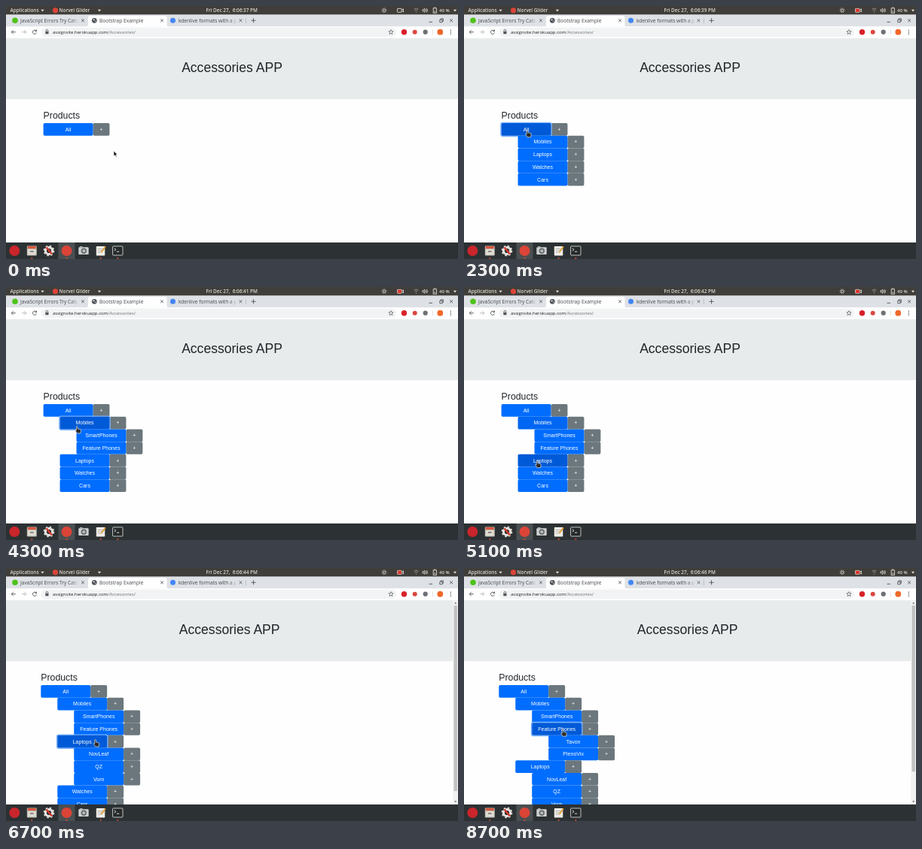
An HTML page that plays this animation: 600 by 337 pixels, repeating every 9 s.

```html
<!DOCTYPE html>
<html lang="en">
<head>
<meta charset="utf-8">
<title>Accessories APP</title>
<style>
  html, body { margin: 0; width: 100%; height: 100%; overflow: hidden; background: #fefefe; }
  svg { display: block; width: 600px; height: 337px; }
  text { white-space: pre; }
  .ui { font: 6.6px "Open Sans", "Noto Sans", sans-serif; }
  .bar { fill: #dfdbd2; font-size: 6.4px; font-weight: 600; }
  .tab { fill: #45494d; }
  .page { font-family: "Liberation Sans", Arial, sans-serif; fill: #212529; }
  .btn { font-size: 7.03px; fill: #fff; text-anchor: middle; }
  .line { fill: none; stroke: #50555a; stroke-width: .9; }
  .tray { fill: none; stroke: #dfdbd2; stroke-width: .9; }
</style>
</head>
<body>
<svg viewBox="0 0 600 337" xmlns="http://www.w3.org/2000/svg">
  <defs>
    <clipPath id="view"><rect y="42.5" width="600" height="272.5"/></clipPath>
    <linearGradient id="fade"><stop offset=".86" stop-color="#fff"/><stop offset="1" stop-color="#000"/></linearGradient>
    <mask id="fadeA"><rect x="18" y="12" width="79" height="14" fill="url(#fade)"/></mask>
    <mask id="fadeB"><rect x="228" y="12" width="79" height="14" fill="url(#fade)"/></mask>
  </defs>
  <rect width="600" height="337" fill="#fefefe"/>

  <!-- web page -->
  <g clip-path="url(#view)" class="page">
    <rect id="hero" y="42.8" width="600" height="81.4" rx="2" fill="#e8ebeb"/>
    <g id="content">
      <text x="300" y="88.3" font-size="17.57" text-anchor="middle">Accessories APP</text>
      <text x="49.6" y="150" font-size="12.3">Products</text>
      <g id="tree"></g>
    </g>
    <g id="scroll">
      <rect x="593.4" y="42.5" width="6.6" height="273" fill="#f1f1f1"/>
      <rect id="thumb" x="594.5" y="50" width="4.4" height="247" fill="#c1c1c1"/>
      <path d="M595.2 47.4h3l-1.5-2zM595.2 310.2h3l-1.5 2z" fill="#606060"/>
    </g>
  </g>

  <!-- desktop bar -->
  <g class="ui">
    <rect width="600" height="11.6" fill="#403e3a"/>
    <g class="bar">
      <text x="5.5" y="8.2">Applications</text>
      <path d="M46.3 4.8h4.4l-2.2 2.8zM121.8 4.8h4.4l-2.2 2.8zM593.8 4.8h4.4l-2.2 2.8z"/>
      <circle cx="65.5" cy="5.8" r="3.6" fill="#db4437"/>
      <text x="70.5" y="8.2">Norvel Glider</text>
      <text id="clock" x="299.7" y="8.2" text-anchor="middle"></text>
      <text x="575" y="8.2" font-size="6">40 %</text>
    </g>
    <g class="tray">
      <circle cx="502" cy="5.8" r="1.7"/>
      <circle cx="502" cy="5.8" r="3" stroke-dasharray="1 1.36"/>
      <rect x="519.5" y="3.4" width="5.6" height="4.9" rx=".6"/>
      <path d="M525.3 5.2l2.2-1.3v4l-2.2-1.3"/>
      <path d="M541.6 4.2q2.9-2.4 5.8 0M542.7 5.9q1.8-1.4 3.6 0M544.5 7.2v1.6" stroke="#9a968e"/>
      <path d="M553 4.8h1.2l1.6-1.5v5l-1.6-1.5H553zM557.2 4.2q1.2 1.6 0 3.2M558.5 3.2q2 2.6 0 5.2"/>
      <rect x="567.2" y="2.9" width="4.2" height="6.4"/>
      <path d="M568.3 2h2M568.2 7.2h2.2"/>
    </g>
    <rect id="rec" x="519.9" y="3.8" width="4.9" height="4.2" fill="#e0352f"/>

    <!-- browser tabs -->
    <rect y="11.6" width="600" height="15.8" fill="#dee1e5"/>
    <path d="M106 27.4q3 0 3-3V15.5q0-2.5 2.5-2.5h99.500q2.500 0 2.500 2.500v8.900q0 3 3 3z" fill="#fefefe"/>
    <path d="M318.300 16v7" stroke="#a5a9ae" stroke-width=".6"/>
    <circle cx="12" cy="19.300" r="3.800" fill="#4fc21b"/>
    <circle cx="117.300" cy="19.300" r="3.400" fill="#4d5358"/>
    <path d="M115 18.200l2-1 1 1.200-1.500 1.200zM118 20l1.700-.5-.8 2z" fill="#dfe2e5"/>
    <circle cx="221.500" cy="19.300" r="3.500" fill="#4285f4"/>
    <g class="tab">
      <text x="19" y="21.600" mask="url(#fadeA)">JavaScript Errors Try Catc</text>
      <text x="124" y="21.600">Bootstrap Example</text>
      <text x="229" y="21.600" mask="url(#fadeB)">kdenlive formats with a p</text>
    </g>
    <g class="line">
      <path id="x" d="M100.200 17.500l3.600 3.600m0-3.600l-3.600 3.600"/>
      <use href="#x" x="105"/><use href="#x" x="209.500"/>
      <path d="M325.500 19.300h6m-3-3v6"/>
      <path d="M561.500 21.300h4.500M575.800 18.300h3.400v3.400h-3.400zM577 18.200v-1.300h3.400v3.400h-1.200M589.200 17.400l3.800 3.800m0-3.800l-3.800 3.800"/>
    </g>

    <!-- toolbar -->
    <rect y="27.400" width="600" height="15.300" fill="#fefefe"/>
    <rect x="46.500" y="28.800" width="471.500" height="12.200" rx="6.100" fill="#f1f3f4"/>
    <g class="line">
      <path d="M12.800 34.700H7.300m2.500-2.600l-2.600 2.600 2.600 2.600"/>
      <path d="M21.200 34.700h5.500m-2.500-2.600l2.600 2.600-2.600 2.600" stroke="#b4b7ba"/>
      <path d="M40 33a2.600 2.600 0 1 0 .5 2.600M40.500 31.500v2.200h-2.200"/>
      <path d="M53.100 34v-1.200a1.300 1.300 0 0 1 2.600 0V34"/>
      <path d="M511 31.600l.9 2 2.200.2-1.700 1.500.5 2.200-1.900-1.200-1.900 1.200.5-2.200-1.700-1.500 2.200-.2z" stroke-width=".7"/>
      <path d="M566.500 31.500v6.500" stroke="#cdd0d3" stroke-width=".6"/>
    </g>
    <rect x="52.300" y="33.900" width="4.200" height="3.300" rx=".4" fill="#50555a"/>
    <text x="62" y="36.900" font-size="6" fill="#202124">assignsite.herokuapp.com<tspan fill="#6b7075">/Accessories/</tspan></text>
    <circle cx="528.500" cy="34.700" r="3.700" fill="#d8202a"/>
    <circle cx="542.700" cy="34.700" r="3" fill="#d9483f"/>
    <circle cx="556.700" cy="34.700" r="3.100" fill="#6d7175"/>
    <circle cx="576.300" cy="34.700" r="3.900" fill="#f0682a"/>
    <g fill="#50555a"><circle cx="590.300" cy="32.200" r=".75"/><circle cx="590.300" cy="34.700" r=".75"/><circle cx="590.300" cy="37.200" r=".75"/></g>
  </g>

  <!-- dock -->
  <rect y="315" width="600" height="22" fill="#2c3133"/>
  <rect x="69.500" y="315" width="22" height="22" fill="#4a4f51"/>
  <circle cx="11.300" cy="326" r="7" fill="#c9252b"/>
  <g>
    <rect x="27.800" y="319.500" width="13" height="13" rx="1.300" fill="#b9b6ad"/>
    <rect x="28.800" y="320" width="11" height="3.200" fill="#d9573e"/>
    <rect x="28.800" y="324" width="11" height="7.500" fill="#dedbd2"/>
    <rect x="32" y="326.200" width="4.600" height="1.600" fill="#77756e"/>
  </g>
  <g fill="none">
    <circle cx="57" cy="326" r="4.600" stroke="#e6e4df" stroke-width="3"/>
    <circle cx="57" cy="326" r="6.500" stroke="#e6e4df" stroke-width="1.600" stroke-dasharray="2.500 2.600"/>
    <path d="M53.500 321.500l7.500 9" stroke="#cf3a30" stroke-width="2.600"/>
  </g>
  <circle cx="80.500" cy="326" r="7" fill="#db4437"/>
  <g>
    <rect x="96.300" y="321.300" width="13.400" height="9.800" rx="1.200" fill="#cfd1d0"/>
    <rect x="98" y="320" width="3.500" height="2" fill="#a9abab"/>
    <circle cx="103.300" cy="326.200" r="3.700" fill="#666a6c"/>
    <circle cx="103.300" cy="326.200" r="2" fill="#b7bcbf"/>
  </g>
  <g>
    <rect x="119.800" y="320" width="11.500" height="12.500" rx=".8" fill="#eeece6"/>
    <path d="M121.500 323.500h7m-7 2.300h6m-6 2.300h5" stroke="#a5a39d" stroke-width=".7"/>
    <path d="M132 320.500l-5.500 7.500" stroke="#e19a2e" stroke-width="1.800"/>
  </g>
  <g>
    <rect x="141.600" y="320" width="13.400" height="12" rx="1" fill="#262a2b" stroke="#bfc2c0"/>
    <path d="M143.800 322.800l2.200 1.700-2.200 1.700M147 327.200h3.200" fill="none" stroke="#f3f3f1" stroke-width=".9"/>
  </g>
  <g fill="#e5502c"><circle cx="34.300" cy="335.900" r="1"/><circle cx="80.500" cy="335.900" r="1"/><circle cx="125.700" cy="335.900" r="1"/><circle cx="148.300" cy="335.900" r="1"/></g>

  <!-- pointer -->
  <g id="pointer" stroke="#fff" stroke-width=".6" stroke-linejoin="round">
    <path id="arrow" d="M0 0v7l1.600-1.400 1.200 2.500 1.200-.6-1.200-2.400h2.100z" fill="#151515"/>
    <path id="hand" d="M-.8.6q.8-1.200 1.600 0v3l3.200.7q1.300.4 1.200 1.700l-.5 3.700H.1l-2.400-3.800q-.2-1.200 1.500-.3z" fill="#2b2b2b"/>
  </g>
</svg>
<script>
const LOOP = 9000, STEP = 100, FADE = 150;
const ROW = 16.69, INDENT = 21.96, LEFT = 49.6, TOP = 156.1, WIDTH = 65.9;
const SCROLL_AT = 5900;
const $ = id => document.getElementById(id);

// name, depth, time shown, dark spans, focus span
const rows = [
  ["All", 0, 0, [[1000, 3100]], [1050, 3050]],
  ["Mobiles", 1, 1900, [[2700, 5000]], [3200, 4950]],
  ["SmartPhones", 2, 3800, [[4350, 4500]]],
  ["Feature Phones", 2, 3800, [[4500, 4650], [6750, LOOP]], [8350, LOOP]],
  ["Tavon", 3, 8600],
  ["PlenoVix", 3, 8600],
  ["Laptops", 1, 1900, [[4650, 6850]], [5100, 6800]],
  ["NovLeaf", 2, SCROLL_AT, [[6250, 6450]]],
  ["QZ", 2, SCROLL_AT],
  ["Vorn", 2, SCROLL_AT],
  ["Watches", 1, 1900],
  ["Cars", 1, 1900]
].map(([name, depth, from, dark = [], focus = [LOOP, LOOP]]) => ({ name, depth, from, dark, focus }));

// time, x, y
const path = [
  [0, 143, 193], [700, 125, 165], [1000, 125, 165], [1100, 88, 165], [1200, 84, 165],
  [2500, 84, 165], [2900, 94, 182], [4200, 94, 182], [4900, 98, 239], [5000, 98, 239],
  [5100, 97, 231], [6100, 97, 231], [6400, 106, 242], [7000, 131, 214.500], [LOOP, 131, 214.500]
];

function add(parent, tag, attrs, label) {
  const el = document.createElementNS("http://www.w3.org/2000/svg", tag);
  for (const key in attrs) el.setAttribute(key, attrs[key]);
  if (label) el.textContent = label;
  return parent.appendChild(el);
}

for (const row of rows) {
  row.group = add($("tree"), "g", { class: "btn" });
  const box = { y: 0, height: ROW, rx: 1.76 };
  row.plus = add(row.group, "rect", { ...box, x: WIDTH, width: INDENT, fill: "#6b777c" });
  row.ring = add(row.group, "rect", {
    x: -.7, y: -.7, width: WIDTH + 1.4, height: ROW + 1.4, rx: 2.4,
    fill: "none", stroke: "#7db4ff", "stroke-width": 1.4
  });
  row.button = add(row.group, "rect", { ...box, x: 0, width: WIDTH });
  add(row.group, "text", { x: WIDTH / 2, y: 10.700 }, row.name);
  add(row.group, "text", { x: WIDTH + INDENT / 2, y: 10.700 }, "+");
}

const clamp = v => Math.min(1, Math.max(0, v));
const level = (t, [from, to]) => clamp((t - from) / FADE) - clamp((t - to) / FADE);
const mix = (a, b, k) => `rgb(${a.map((v, i) => Math.round(v + (b[i] - v) * k))})`;

function pointerAt(t) {
  const i = path.findIndex(p => p[0] > t);
  const [t0, x0, y0] = path[i - 1], [t1, x1, y1] = path[i];
  const k = (t - t0) / (t1 - t0), e = k * k * (3 - 2 * k);
  return [x0 + (x1 - x0) * e, y0 + (y1 - y0) * e];
}

function draw(t) {
  let count = 0;
  for (const row of rows) {
    const shown = t >= row.from;
    row.group.setAttribute("display", shown ? "inline" : "none");
    if (!shown) continue;
    row.group.setAttribute("transform", `translate(${LEFT + row.depth * INDENT} ${TOP + count++ * ROW})`);
    const dark = Math.max(0, ...row.dark.map(span => level(t, span)));
    row.button.setAttribute("fill", mix([0, 109, 255], [0, 90, 215], dark));
    row.ring.setAttribute("opacity", level(t, row.focus));
  }
  rows[0].plus.setAttribute("fill", mix([107, 119, 124], [90, 100, 105], level(t, [600, 1000])));

  const scrolls = t >= SCROLL_AT;
  $("content").setAttribute("transform", `translate(${scrolls ? -3.3 : 0} 0)`);
  $("hero").setAttribute("width", scrolls ? 593.4 : 600);
  $("scroll").setAttribute("display", scrolls ? "inline" : "none");
  $("thumb").setAttribute("height", 258 * 272.5 / (TOP - 42.5 + count * ROW + 4));

  const [x, y] = pointerAt(t), hand = t >= 600;
  $("pointer").setAttribute("transform", `translate(${x} ${y})`);
  $("arrow").setAttribute("display", hand ? "none" : "inline");
  $("hand").setAttribute("display", hand ? "inline" : "none");

  $("rec").setAttribute("display", t >= 400 ? "inline" : "none");
  $("clock").textContent = `Fri Dec 27,  6:06:${37 + Math.floor((t + 300) / 1000)} PM`;
}

let last = -1;
function tick() {
  const t = Math.floor(performance.now() % LOOP / STEP) * STEP;
  if (t !== last) draw(last = t);
  requestAnimationFrame(tick);
}
tick();
</script>
</body>
</html>
```
